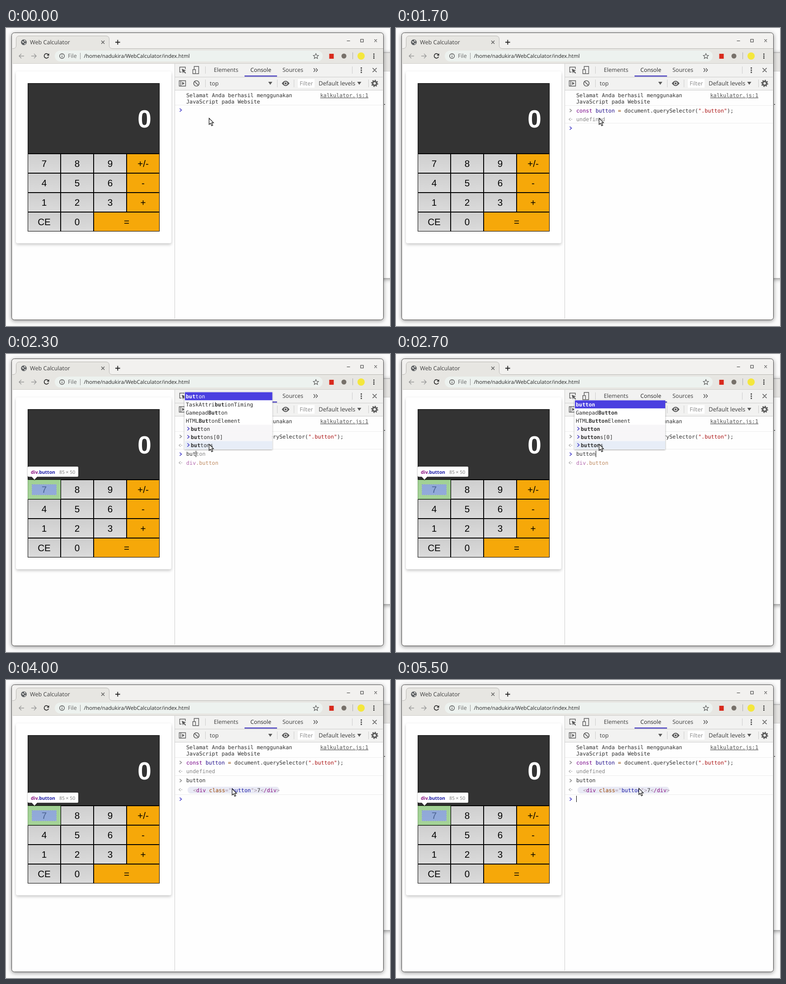
Animation, 850 px wide and 659 px high, one loop 6 s. Source, as an HTML page:

```html
<!DOCTYPE html>
<html lang="id">
<head>
<meta charset="utf-8">
<title>Web Calculator</title>
<style>
  html, body { margin: 0; width: 100%; height: 100%; overflow: hidden; background: #fbfbfb; }
  svg { display: block; width: 850px; height: 659px; }
  text { white-space: pre; text-rendering: geometricPrecision; }
  .ui { font: 12.6px "Open Sans", "Noto Sans", sans-serif; fill: #3c3c3c; }
  .tip { font: 10.4px "Open Sans", "Noto Sans", sans-serif; }
  .mono { font: 11.81px "DejaVu Sans Mono", monospace; fill: #303030; }
  .key { font: 20.6px "Liberation Sans", Arial, sans-serif; text-anchor: middle; }
  .b { font-weight: bold; }
  .kw { fill: #770088; } .def { fill: #22108c; } .op { fill: #8f4a00; } .str { fill: #a11; }
  .tag { fill: #881280; } .attr { fill: #994500; } .val { fill: #1a1aa6; } .pun { fill: #a894a6; }
  .dim { fill: #858585; }
  .icon { fill: none; stroke: #5a5a5a; stroke-width: 1.4; }
  .rule { stroke: #ececec; }
  .sep { stroke: #ccc; }
  .win { filter: drop-shadow(0 2px 5px rgba(0,0,0,.4)); }
  .card { filter: drop-shadow(0 3px 3px rgba(0,0,0,.22)); }
  .float { filter: drop-shadow(0 1px 1.5px rgba(0,0,0,.4)); }
</style>
</head>
<body>
<svg viewBox="0 0 850 659">
  <defs>
    <linearGradient id="grey" x2="0" y2="1">
      <stop stop-color="#cecece"/><stop offset="1" stop-color="#dbdbdb"/>
    </linearGradient>
    <clipPath id="filterBox"><path d="M646 112h33.5v21h-33.5z"/></clipPath>
  </defs>

  <!-- window behind -->
  <g class="win">
    <path d="M800 54.5h60v499h-60z" fill="#fefefe" stroke="#aaa"/>
    <path d="M800 55h60v40h-60z" fill="#e4e3e1"/>
    <path d="M800 95.5h60" class="sep"/>
  </g>
  <path d="M837 168h2v2h-2z" fill="#555"/>

  <!-- browser frame -->
  <rect class="win" x="12.5" y="10.5" width="823" height="635" rx="6" fill="#f2f1ef" stroke="#4d4d4d"/>
  <path d="M14 46H16Q23 46 23 39V25Q23 17.500 30 17.500H221Q228 17.500 228 25V39Q228 46 235 46H835V79H14Z" fill="#e7e6e2"/>
  <path d="M14 45.500H16Q22.500 45 22.500 39V25Q22.500 17.500 30 17.500H221Q228.500 17.500 228.500 25V39Q228.500 45 235 45.500H835" fill="none" stroke="#b9b7b3"/>
  <path d="M15 79H834V643H15Z" fill="#fefefe"/>
  <path d="M15 78.500H834" stroke="#cfcdc9"/>
  <circle cx="39.500" cy="31.500" r="6.300" fill="#5b5e61"/>
  <path d="M35 29l4 1 1 2-3 1zM40 26l4 3-2 1-2-1zM40 34l4-1-2 4z" fill="#e7e6e2"/>
  <text class="ui" x="53" y="36">Web Calculator</text>
  <path class="icon" d="M211 28l7 7m0-7l-7 7"/>
  <path class="icon" d="M242 31.500h10.500m-5.200-5.200v10.500" style="stroke:#222;stroke-width:1.800"/>
  <path class="icon" d="M754.500 28.500h7m23.500-3.500h6v6h-6zm30.500 0l5.500 6m0-6l-5.500 6" style="stroke:#333;stroke-width:1.100"/>
  <path class="icon" d="M40 62H29m5-5l-5 5 5 5M56 62h11m-5-5l5 5-5 5" style="stroke:#999"/>
  <path class="icon" d="M94 59.500a5 5 0 1 0 .2 4" style="stroke:#333;stroke-width:1.800"/>
  <path d="M95.500 56v5.200h-5.200z" fill="#333"/>
  <rect x="108" y="50" width="593" height="24" rx="12" fill="#edf2ef"/>
  <circle class="icon" cx="124" cy="62" r="5.300"/>
  <path class="icon" d="M124 61v4m0-6.700v1.400"/>
  <text class="ui dim" x="137" y="66.300" style="font-size:12.400px;fill:#666">File</text>
  <path class="sep" d="M164.500 55v14" style="stroke:#999"/>
  <text class="ui" x="172.500" y="66.300" style="font-size:11.700px;fill:#252525">/home/nadukira/WebCalculator/index.html</text>
  <path class="icon" d="M686 56.500l1.700 3.800 4.100.4-3.100 2.700.9 4.100-3.600-2.200-3.600 2.200.9-4.100-3.100-2.700 4.100-.4z" style="stroke-width:1.200"/>
  <rect x="715.500" y="57" width="10" height="11" fill="#d9291c"/>
  <circle cx="748" cy="62" r="5.500" fill="#77716a"/>
  <path class="sep" d="M767.500 54v15" style="stroke:#aaa"/>
  <circle cx="786" cy="62" r="8" fill="#f4e73c"/>
  <path d="M813 56.500h2.600v2.600h-2.600zm0 4.300h2.600v2.600h-2.600zm0 4.300h2.600v2.600h-2.600z" fill="#333"/>

  <!-- calculator -->
  <rect class="card" x="22" y="96" width="344" height="380" rx="4" fill="#fff"/>
  <rect x="48.500" y="122.500" width="291" height="155" fill="#333" stroke="#000"/>
  <text class="key b" x="306.500" y="220" style="font-size:55px" fill="#fff">0</text>
  <g id="keys"></g>

  <!-- developer tools -->
  <path d="M374 79H834V137H374Z" fill="#f2f2f1"/>
  <path class="sep" d="M373.500 79V643M374 108.500H834M374 137.500H834M441.500 85v16M766.500 85v16M441.500 114v17M600.500 114v17M637.500 114v17M802.500 114v17"/>
  <path class="icon" d="M397 91v-4.500h-12.500v11h4"/>
  <path d="M389 90l9.500 4-4 1.300 4 4-1.500 1.500-4-4-1.500 3.700z" fill="#5a5a5a"/>
  <path class="icon" d="M416.500 91v-6h10v16h-6M413.500 92h6v9h-6z"/>
  <text class="ui" x="460" y="97">Elements</text>
  <text class="ui" x="541" y="97" style="font-size:12.300px;fill:#222">Console</text>
  <text class="ui" x="612" y="97" style="font-size:12.500px">Sources</text>
  <path d="M528 105h72v2.500h-72z" fill="#4f46c0"/>
  <path class="icon" d="M681 89l3.500 4-3.500 4m5-8l3.500 4-3.500 4M811.500 88.500l9 9m0-9l-9 9" style="stroke-width:1.600"/>
  <path d="M785 87h3v3h-3zm0 4.700h3v3h-3zm0 4.700h3v3h-3z" fill="#5a5a5a"/>
  <path class="icon" d="M383.500 116.500h14v12h-14zm3.500 0v12"/>
  <path d="M390 119l5 3.500-5 3.500z" fill="#5a5a5a"/>
  <path class="icon" d="M417 118l9 9" style="stroke-width:1.700"/>
  <circle class="icon" cx="421.500" cy="122.500" r="6" style="stroke-width:1.700"/>
  <text class="ui" x="451" y="127">top</text>
  <path d="M580.500 119h9l-4.500 6.500zM777.500 119h9l-4.500 6.500z" fill="#5a5a5a"/>
  <path d="M610.500 122.500q8.500-11.500 17 0q-8.500 11.500-17 0z" fill="#5a5a5a"/>
  <circle cx="619" cy="122.500" r="3" fill="#5a5a5a" stroke="#f2f2f1" stroke-width="1.500"/>
  <path d="M646 113h37v19h-37z" fill="#fff"/>
  <text class="ui" x="650" y="127" clip-path="url(#filterBox)" style="fill:#888">Filter</text>
  <text class="ui" x="692" y="127" style="font-size:13px">Default levels</text>
  <circle class="icon" cx="816" cy="122.500" r="4.300" style="stroke-width:3.200"/>
  <circle class="icon" cx="816" cy="122.500" r="6.600" style="stroke-width:2.600" stroke-dasharray="2.592"/>

  <!-- console -->
  <text class="mono" x="399" y="153">Selamat Anda berhasil menggunakan</text>
  <text class="mono" x="399" y="166.500">JavaScript pada Website</text>
  <text class="mono" x="695.500" y="153" style="fill:#555" text-decoration="underline">kalkulator.js:1</text>
  <g id="log"></g>
  <text id="typed" class="mono" x="399" y="225"></text>
  <path id="caret" d="M0 0h1v14h-1z" fill="#000"/>
  <g id="popups"></g>

  <!-- element inspector -->
  <g data-on="2300-3300 4000">
    <path d="M48 278h73v43h-73zM57 288v24h55v-24z" fill="#93d282" fill-opacity=".75" fill-rule="evenodd"/>
    <path d="M57.500 288.500h54v23h-54z" fill="#6f94dc" fill-opacity=".66" stroke="#7f9fc0" stroke-dasharray="2 2"/>
    <path class="float" d="M50 249H158Q160 249 160 251V269Q160 271.500 158 271.500H69L63 278 57 271.500H50Q48 271.500 48 269V251Q48 249 50 249Z" fill="#fff"/>
    <text class="tip b" x="55" y="264.500"><tspan class="tag">div</tspan><tspan class="val">.button</tspan></text>
    <text class="tip" x="118" y="264.500" fill="#777">85 × 50</text>
  </g>
  <path id="mouse" d="M.5.500V14.500L3.800 11.500 6.200 17.300 8.700 16.200 6.300 10.700H10.500Z" fill="#fff" stroke="#111" stroke-width="1.200"/>
</svg>
<script>
const LOOP = 6000, CHAR = 7.11, LEFT = 399;
const $ = id => document.getElementById(id);

// Calculator keys
$('keys').innerHTML = '7 8 9 +/- 4 5 6 - 1 2 3 + CE 0 ='.split(' ').map((label, i) => {
  const x = 48 + i % 4 * 73, y = 278 + (i >> 2) * 43, w = label === '=' ? 146 : 73;
  const fill = i % 4 === 3 || label === '=' ? '#f6a809' : 'url(#grey)';
  return `<rect x="${x + .5}" y="${y + .5}" width="${w - 1}" height="42" fill="${fill}" stroke="#000"/>
    <text class="key" x="${x + w / 2}" y="${y + 29}">${label}</text>`;
}).join('');

// Console rows
const span = (cls, s) => `<tspan class="${cls}">${s}</tspan>`;
const row = (on, y, html, x = LEFT) => `<text data-on="${on}" class="mono" x="${x}" y="${y}">${html}</text>`;
const rule = (on, y) => `<path data-on="${on}" class="rule" d="M374 ${y + .5}H834"/>`;
const chevron = (on, y, color = '#4038c8') =>
  `<path data-on="${on}" d="M384.500 ${y - 3.5}l4 3.500-4 3.500" fill="none" stroke="${color}" stroke-width="1.600"/>`;
const past = (on, y) => chevron(on, y, '#858585');
const result = (on, y) =>
  `<path data-on="${on}" d="M386.500 ${y - 3}l-3.500 3 3.500 3M388 ${y}h2" fill="none" stroke="#aaa" stroke-width="1.300"/>`;

const code = span('kw', 'const') + ' ' + span('def', 'button') + ' ' + span('op', '=') +
  ' document.querySelector(' + span('str', '".button"') + ');';
const node = span('pun', '&lt;') + span('tag', 'div') + ' ' + span('attr', 'class') + span('pun', '="') +
  span('val', 'button') + span('pun', '"&gt;') + '7' + span('pun', '&lt;') + span('tag', '/div') + span('pun', '&gt;');

$('log').innerHTML = [
  rule('0-1200', 170), rule('1200', 171), rule('1200-1300', 191), rule('1300-3300', 210),
  rule('3300', 211), rule('3300-3400', 231), rule('3400', 253),
  chevron('0-1200', 181.5), chevron('1200-1300', 201.5), chevron('1300-3300', 221.5),
  chevron('3300-3400', 242), chevron('3400', 263.5),
  past('1200', 182.5), past('3300', 222.5),
  result('1300', 202), result('2300-3300', 240.5), result('3400', 242.5),
  '<rect data-on="4000" x="402" y="236" width="203" height="15" rx="7" fill="#e9eaf5"/>',
  row('500-1200', 185.5, code), row('1200', 186.5, code),
  row('1300', 206, span('dim', 'undefined')),
  `<g opacity=".62">${row('2300-3300', 244.5, span('tag', 'div') + span('attr', '.button'))}</g>`,
  row('3300', 226, 'button'), row('3400', 247.5, node, 414)
].join('');

// Suggestion lists; a leading ">" marks an entry from the history
function popup(on, query, y, w, names, scroll) {
  const h = names.length * 18 + 1, inner = scroll ? w - 12 : w;
  const rows = names.map((name, i) => {
    const old = name[0] === '>', s = old ? name.slice(1) : name;
    const k = s.toLowerCase().indexOf(query), end = k + query.length, top = y + .5 + i * 18;
    const bg = !i ? '#4a3fe0' : !old ? '#fff' : i === names.length - 1 && !scroll && y < 200 ? '#e7edf7' : '#f7f6f8';
    return `<path d="M396 ${top}h${inner - 1}v18H396z" fill="${bg}"/>` +
      (old ? `<path d="M401.500 ${top + 5}l4 3.700-4 3.700" fill="none" stroke="#4038c8" stroke-width="1.500"/>` : '') +
      `<text class="mono" x="${old ? 409 : 398}" y="${top + 13}"${i ? '' : ' style="fill:#fff"'}>` +
      s.slice(0, k) + span('b', s.slice(k, end)) + s.slice(end) + '</text>';
  }).join('');
  const x = 395 + inner, bar = scroll ? `<path d="M${x} ${y}h12v${h}h-12z" fill="#f1f1f1"/>
    <path d="M${x + 1} ${y + 13}h10v36h-10z" fill="#c1c1c1"/>
    <path d="M${x + 3} ${y + 9}l3.500-4 3.500 4z" fill="#a0a0a0"/>
    <path d="M${x + 3} ${y + h - 9}l3.500 4 3.500-4z" fill="#505050"/>` : '';
  return `<g data-on="${on}"><path class="float" d="M395 ${y}h${w}v${h}h${-w}z" fill="#fff"/>${rows}${bar}</g>`;
}
const history = ['>button', '>buttons[0]', '>buttons'];
const startsB = ('blur btoa button BackgroundFetchManager BackgroundFetchRecord BackgroundFetchRegistration ' +
  'BarProp BaseAudioContext BatteryManager BeforeInstallPromptEvent BeforeUnloadEvent BigInt BigInt64Array ' +
  'BigUint64Array BiquadFilterNode Blob BlobEvent Boolean BroadcastChannel ByteLengthQueuingStrategy').split(' ');
const hasBu = ('button ArrayBuffer AudioBuffer AudioBufferSourceNode SharedArrayBuffer SourceBuffer ' +
  'SourceBufferList TaskAttributionTiming GamepadButton HTMLButtonElement').split(' ');
const hasButt = ['button', 'GamepadButton', 'HTMLButtonElement', ...history];
$('popups').innerHTML =
  popup('2100-2200', 'b', 231, 301, startsB, true) +
  popup('2200-2300', 'bu', 231, 195, [...hasBu, ...history]) +
  popup('2300-2500', 'but', 84, 194.5, ['button', 'TaskAttributionTiming', ...hasButt.slice(1)]) +
  popup('2500-2600', 'butt', 102, 201, hasButt) +
  popup('2600-2700', 'butto', 102, 201, hasButt) +
  popup('2700-2900', 'button', 102, 201, hasButt);

// Timed values: [start, ...values]
const typing = [[0, '', ''], [2100, 'b', 'lur'], [2200, 'bu', 'tton'], [2300, 'but', 'ton'], [2400, 'butt', 'on'],
  [2600, 'butto', 'n'], [2700, 'button', ''], [3300, '', '']];
// column and top; no values means blinked off
const carets = [[0], [100, 0, 174], [500, 49, 174], [1100], [1200, 0, 194], [1300, 0, 214], [1700],
  ...typing.slice(1, -1).map(([t, s]) => [t, s.length, 214]),
  [3300, 0, 235], [3400, 0, 256], [4000], [4500, 0, 256], [5000], [5500, 0, 256]];
const moves = [[0, 449, 199], [3900, 476, 221], [4000, 500, 240], [4200, 512, 236], [4300, 534, 233], [4400, 552, 235],
  [4500, 536, 238], [4600, 516, 239], [4700, 550, 239], [4800, 579, 239], [4900, 558, 239], [5000, 537, 239]];
const at = (steps, t) => steps.findLast(step => step[0] <= t);

const timed = [...document.querySelectorAll('[data-on]')].map(el => ({
  el, spans: el.dataset.on.split(' ').map(s => s.split('-').map(Number))
}));

function draw(t) {
  for (const { el, spans } of timed)
    el.style.display = spans.some(([a, b = LOOP]) => t >= a && t < b) ? '' : 'none';
  const [, text, ghost] = at(typing, t);
  $('typed').innerHTML = text + span('dim', ghost);
  const [, col, top] = at(carets, t);
  $('caret').style.display = top ? '' : 'none';
  if (top) $('caret').setAttribute('transform', `translate(${Math.round(LEFT + col * CHAR)} ${top})`);
  const [, x, y] = at(moves, t);
  $('mouse').setAttribute('transform', `translate(${x} ${y})`);
}

const start = performance.now();
function tick() {
  draw((performance.now() - start) % LOOP);
  requestAnimationFrame(tick);
}
tick();
</script>
</body>
</html>
```
